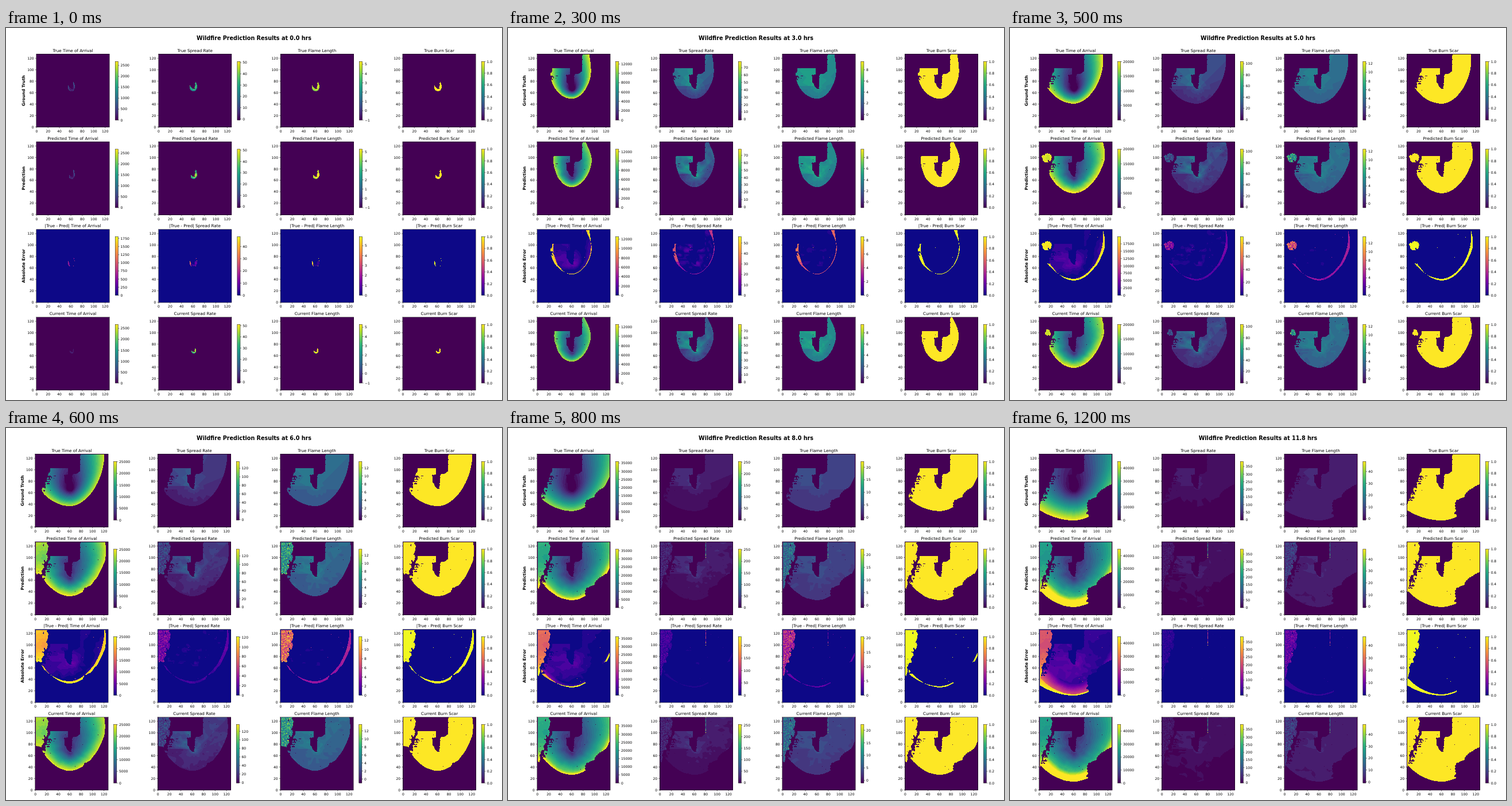
Write an HTML page with a canvas that moves like this. It is 864x648 px and loops after 1.3 s.

```html
<!DOCTYPE html>
<html lang="en">
<head>
<meta charset="utf-8">
<title>Wildfire Prediction Results</title>
<style>
html, body { margin: 0; width: 864px; height: 648px; overflow: hidden; background: #fff; }
canvas { display: block; }
</style>
</head>
<body>
<canvas id="stage" width="864" height="648"></canvas>
<script>
const ctx = document.getElementById('stage').getContext('2d');
const N = 128, SIZE = 127.4, FONT = '"DejaVu Sans", sans-serif';
const COLS = ['Time of Arrival', 'Spread Rate', 'Flame Length', 'Burn Scar'];
const ROWS = ['True', 'Predicted', '|True - Pred|', 'Current'];
const SIDE = ['Ground Truth', 'Prediction', 'Absolute Error', ''];

// Values at key hours, linear in between
const HOURS = [0, 3, 5, 6, 8, 10, 12];
const MAX = [
  [2680, 12550, 20050, 25100, 36000, 45100, 45100],
  [51, 78.5, 104, 136, 253, 380, 383],
  [5.3, 9.5, 12.5, 13.6, 22.3, 35.5, 48.5],
  [1, 1, 1, 1, 1, 1, 1]
];
const ERR_MAX = [
  [1800, 12500, 19900, 25100, 36000, 45100, 45100],
  [48, 56, 90, 121, 236, 372, 383],
  [5.9, 8.5, 13.4, 12.8, 20.5, 33.7, 47],
  [1, 1, 1, 1, 1, 1, 1]
];
const PRED_HOUR = [-0.05, 3.2, 5.7, 6.9, 8.5, 9.9, 11.3];
const UNBURNED = [0, -1, -1, 0];

// Firebreak in the middle, and the right limit of the fuel by height
const BREAK = [[27, 103], [58, 103], [58, 92], [51.5, 91], [52, 78], [55, 75], [57, 70], [60, 67.5],
  [63, 67], [64, 72], [65, 80], [66, 92], [73, 93], [79, 97], [80, 130], [27, 130]];
const EDGE_Y = [0, 12, 18, 24, 30, 38, 42, 47, 48, 53, 60, 64, 68, 72, 75, 76];
const EDGE_X = [85, 85, 88, 83, 86, 83, 84, 86, 89, 99, 104, 108, 114, 120, 128, 140];

function lerp(xs, ys, x) {
  let i = 0;
  while (i < xs.length - 2 && x > xs[i + 1]) i++;
  const f = Math.min(1, (x - xs[i]) / (xs[i + 1] - xs[i]));
  return ys[i] + (ys[i + 1] - ys[i]) * f;
}

function rnd(x, y) {
  const v = Math.sin(x * 127.1 + y * 311.7) * 43758.5453;
  return v - Math.floor(v);
}

function noise(x, y) {
  const i = Math.floor(x), j = Math.floor(y), u = x - i, v = y - j;
  return (rnd(i, j) * (1 - u) + rnd(i + 1, j) * u) * (1 - v)
    + (rnd(i, j + 1) * (1 - u) + rnd(i + 1, j + 1) * u) * v;
}

// Colour stops for the bars and a banded table for the maps
const BANDS = 26;
function palette(hex) {
  const stops = hex.split(' ').map(h => [0, 2, 4].map(i => parseInt(h.substr(i, 2), 16)));
  const lut = Array.from({ length: BANDS }, (_, i) => {
    const p = i / (BANDS - 1) * (stops.length - 1), k = Math.min(stops.length - 2, Math.floor(p));
    return stops[k].map((c, j) => c + (stops[k + 1][j] - c) * (p - k));
  });
  return { stops, lut };
}
const VIRIDIS = palette('440154 482878 3e4989 31688e 26828e 1f9e89 35b779 6ece58 b5de2b fde725');
const PLASMA = palette('0d0887 46039f 7201a8 9c179e bd3786 d8576b ed7953 fb9f3a fdca26 f0f921');

function inBreak(x, y) {
  let inside = false;
  BREAK.forEach(([ax, ay], i) => {
    const [bx, by] = BREAK[(i + 1) % BREAK.length];
    if (ay > y !== by > y && x < ax + (bx - ax) * (y - ay) / (by - ay)) inside = !inside;
  });
  return inside;
}

// Hour at which the growing, rising ellipse reaches a point
function frontHour(x, y, westSpeed) {
  const dx = Math.abs(x - 62), a = x < 62 ? westSpeed : 31, p = x < 62 ? 2 : 1.8;
  let lo = 0.01, hi = 6;
  for (let i = 0; i < 18; i++) {
    const s = (lo + hi) / 2;
    let dy = (65 + 32 * s - y) / (47 * s);
    if (dy < 0) dy *= -0.6;
    if ((dx / (a * s + 1.2)) ** p + dy ** p > 1) lo = s; else hi = s;
  }
  return (15 * lo - 2.3) / 4.3;
}

function makeCell(i, j) {
  const x = i + 0.5, y = j + 0.5;
  const cell = { i, j, real: Infinity, pred: Infinity, west: false };
  if (i < 1 || i > 126 || j > 126) return cell;
  const jx = noise(x / 2, y / 2) * 2 - 1, jy = noise(x / 2 + 40, y / 2) * 2 - 1;
  if (inBreak(x + jx * 0.7, y + jy * 0.7) || x > lerp(EDGE_Y, EDGE_X, y) + jx * 2) return cell;

  // Distance right of the slanted western border
  const u = x - (27 - Math.max(0, 102 - y) * 0.42);
  const dist = Math.hypot(x - 62, y - 66);
  if (u > jx && (y < 103 || x > 70)) {
    const ragged = y > 46 && y < 90 && noise(x / 1.9 + 9, y / 1.9) > 0.42 + u / 32;
    if (ragged && u < 16) return cell;
    cell.real = frontHour(x, y, 38);
    cell.pred = frontHour(x, y, 31) + Math.max(0, y - 95) * 0.022 + (noise(x / 6, y / 6) - 0.5) * 0.15;
    if (rnd(i + 3, j) > 0.9988) cell.pred = Infinity;
  } else {
    const gap = (1 + 7 * noise(x / 4, y / 4 + 70)) * Math.max(0, Math.min(1, (y - 45) / 15));
    if (u > -gap || (u > -gap - 8 && noise(x / 2, y / 2 + 30) > 0.75)) return cell;
    const d = Math.hypot(x - 14, (y - 98) * (y > 98 ? 0.7 : 1.2));
    cell.west = true;
    cell.pred = 5.3 + (d + noise(x / 3, y / 3) * 7 - 3) / 20;
  }

  // Spread rate is constant over sectors around the ignition point
  const sector = Math.floor(Math.atan2(y - 66, x - 62) / (Math.PI / 8));
  const rise = 0.5 + 0.5 * Math.sin((sector + 0.5) * Math.PI / 8);
  const west = x < 62 && y > 72 ? 18 * Math.exp(-dist / 60) : 0;
  cell.rate = 11 + 15 * rise * rise + west + 16 * Math.exp(-dist / 10) + 2 * rnd(sector, 5);
  cell.near = Math.exp(-dist / 40);
  cell.patch = noise(x / 9 + y / 20, y / 7) + noise(x / 4, y / 4) * 0.3;
  cell.spark = (noise(x / 1.5, y / 1.5) * 0.5 + rnd(i, j) * 0.5) ** 3;
  return cell;
}

const cells = [];
for (let j = N - 1; j >= 0; j--) for (let i = 0; i < N; i++) cells.push(makeCell(i, j));

const arrival = (h, pace) => Math.max(250, pace * h + 900);
const flame = rate => 0.4 + 0.75 * Math.sqrt(rate);

function realValues(c, hour) {
  return c.real > hour ? UNBURNED : [arrival(c.real, 3700), c.rate, flame(c.rate), 1];
}

function predValues(c, hour, n) {
  if (c.pred > hour) return UNBURNED;
  const time = arrival(c.pred, 2600 + n * 90) + 5000 * Math.max(0, c.pred - 7)
    + n * 900 * c.near * (0.5 + c.patch * 0.6);
  if (c.west) return [time, 16 + 70 * c.spark, 4.5 + (4 + n * 0.8) * c.spark * 1.6, 1];
  if (n > 6 && c.i === 80 && c.j > 99) {
    const glow = 0.2 + 0.8 * rnd(c.j, 2) ** 2;
    return [time, glow * lerp(HOURS, MAX[1], n), glow * 0.8 * lerp(HOURS, MAX[2], n), 1];
  }
  const rate = c.rate * (0.6 + 0.6 * c.patch) + 12 * c.near ** 6;
  return [time, rate, flame(rate), 1];
}

const grid = document.createElement('canvas');
grid.width = grid.height = N;
const gridCtx = grid.getContext('2d');
const image = gridCtx.createImageData(N, N);

function drawGrid(values, col, min, max, lut, x, y) {
  values.forEach((v, k) => {
    const t = (v[col] - min) / (max - min);
    const rgb = lut[Math.max(0, Math.min(BANDS - 1, Math.floor(t * BANDS)))];
    for (let b = 0; b < 3; b++) image.data[k * 4 + b] = rgb[b];
    image.data[k * 4 + 3] = 255;
  });
  gridCtx.putImageData(image, 0, 0);
  ctx.imageSmoothingEnabled = false;
  ctx.drawImage(grid, x, y, SIZE, SIZE);
}

function text(str, x, y, size, align = 'center', weight = '') {
  ctx.font = `${weight} ${size}px ${FONT}`;
  ctx.textAlign = align;
  ctx.fillText(str, x, y);
}

function line(x, y, dx, dy) {
  ctx.beginPath();
  ctx.moveTo(x, y);
  ctx.lineTo(x + dx, y + dy);
  ctx.stroke();
}

function tickStep(range) {
  for (let unit = 0.1; ; unit *= 10)
    for (const m of [1, 2, 2.5, 5]) if (range / (m * unit) <= 8) return +(m * unit).toFixed(3);
}

function drawAxes(x, y, title) {
  const bottom = y + SIZE;
  ctx.strokeRect(x, y, SIZE, SIZE);
  for (let v = 0; v <= 120; v += 20) {
    const d = (v + 0.5) * SIZE / N;
    line(x + d, bottom, 0, 2.1);
    text(v, x + d, bottom + 9.1, 6);
    line(x, bottom - d, -2.1, 0);
    text(v, x - 4.2, bottom - d + 2.2, 6, 'right');
  }
  text(title, x + SIZE / 2, y - 3.6, 7.2);
}

function drawBar(x, y, min, max, stops) {
  const w = 5.1, h = 102;
  const fill = ctx.createLinearGradient(0, y + h, 0, y);
  stops.forEach((c, i) => fill.addColorStop(i / (stops.length - 1), `rgb(${c})`));
  ctx.fillStyle = fill;
  ctx.fillRect(x, y, w, h);
  ctx.strokeRect(x, y, w, h);
  ctx.fillStyle = '#000';
  const step = tickStep(max - min);
  for (let k = Math.ceil(min / step); k * step <= max + 1e-9; k++) {
    const v = k * step, ty = y + h * (1 - (v - min) / (max - min));
    line(x + w, ty, 2.1, 0);
    text(v.toFixed(step % 1 ? 1 : 0).replace('-', '\u2212'), x + w + 4.2, ty + 2.2, 6, 'left');
  }
}

function render(n) {
  const hour = Math.min(n, 11.8), predHour = lerp(HOURS, PRED_HOUR, n);
  const real = cells.map(c => realValues(c, hour));
  const pred = cells.map(c => predValues(c, predHour, n));
  const diff = real.map((v, k) => v.map((a, col) => Math.abs(a - pred[k][col])));
  const now = cells.map(c => predValues(c, predHour - 0.2, n));

  // Wider tick labels push the columns apart
  const wide = n > 2, left = wide ? 50.7 : 52.8, pitch = wide ? 213.55 : 212.7;

  ctx.fillStyle = '#fff';
  ctx.fillRect(0, 0, 864, 648);
  ctx.fillStyle = ctx.strokeStyle = '#000';
  ctx.lineWidth = 0.48;
  text(`Wildfire Prediction Results at ${hour.toFixed(1)} hrs`, 432, 20.7, 9.6, 'center', 'bold');

  [real, pred, diff, now].forEach((values, row) => {
    const y = 45.4 + row * 152.7, isError = row === 2;
    const map = isError ? PLASMA : VIRIDIS;
    COLS.forEach((name, col) => {
      const x = left + col * pitch;
      const min = isError ? 0 : UNBURNED[col];
      const max = lerp(HOURS, (isError ? ERR_MAX : MAX)[col], n);
      drawGrid(values, col, min, max, map.lut, x, y);
      drawAxes(x, y, `${ROWS[row]} ${name}`);
      drawBar(x + (wide ? 137 : 137.4), y + 12.9, min, max, map.stops);
    });
    ctx.save();
    ctx.translate(left - 19.8, y + SIZE / 2);
    ctx.rotate(-Math.PI / 2);
    text(SIDE[row], 0, 0, 7.2, 'center', 'bold');
    ctx.restore();
  });
}

const start = performance.now();
let shown = -1;
function tick() {
  const n = Math.floor((performance.now() - start) % 1300 / 100);
  if (n !== shown) render(shown = n);
  requestAnimationFrame(tick);
}
tick();
</script>
</body>
</html>
```
